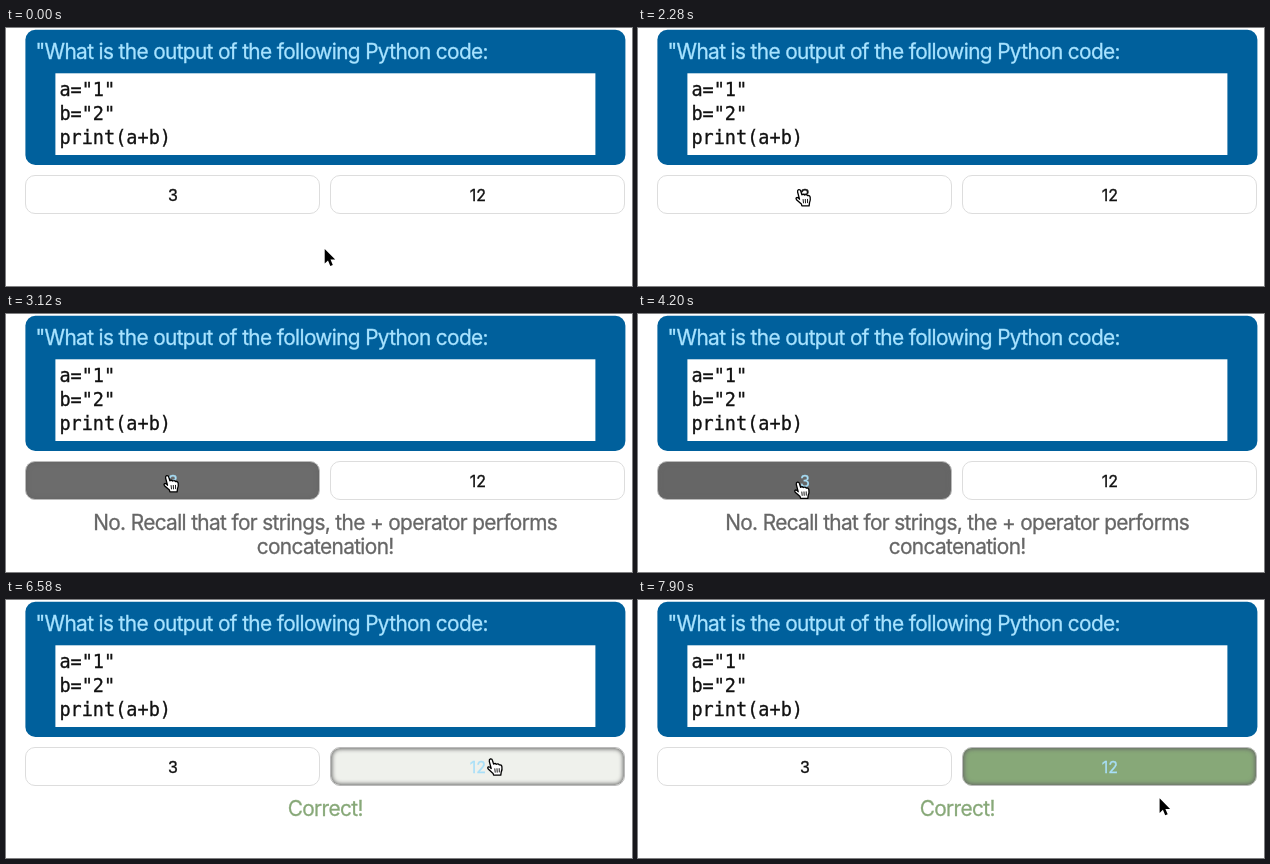
An HTML page that plays this animation: 626x258 px, repeating every 8 s.

```html
<!DOCTYPE html>
<html lang="en">
<head>
<meta charset="utf-8">
<title>Python quiz</title>
<style>
  html, body { margin: 0; width: 100%; height: 100%; overflow: hidden; background: #fff; }
  .answer { position: absolute; box-sizing: border-box; top: 147px; width: 295px; height: 39px;
            border: 1px solid #ddd; border-radius: 10px; }
  .answer.chosen { border-color: #bbb; box-shadow: inset 0 0 4px 1px #666; }
  svg { position: absolute; left: 0; top: 0; }
  text { font: 20.8px Inter, sans-serif; letter-spacing: -.03em; white-space: pre;
         fill: currentColor; stroke: currentColor; stroke-width: .3px; }
  .mono text { font: 18.55px "DejaVu Sans Mono", monospace; letter-spacing: 0; }
  .label { font-size: 16px; letter-spacing: 0; text-anchor: middle; }
  .feedback text { text-anchor: middle; }
</style>
</head>
<body>
<div class="answer" style="left:19px"></div>
<div class="answer" style="left:324px"></div>
<svg width="626" height="258" viewBox="0 0 626 258">
  <rect x="19.4" y="1.7" width="600" height="135.3" rx="10" fill="#00609c"/>
  <rect x="49.4" y="45.3" width="540" height="81.7" fill="#fff"/>
  <text x="29.5" y="31.4" color="#a8e3ff">"What is the output of the following Python code:</text>
  <g class="mono" color="#111">
    <text x="53.4" y="68">a="1"</text>
    <text x="53.4" y="92.2">b="2"</text>
    <text x="53.4" y="116.4">print(a+b)</text>
  </g>
  <text class="label" x="167" y="172.6">3</text>
  <text class="label" x="472" y="172.6">12</text>
  <g class="feedback" id="wrong" color="#666">
    <text x="319.2" y="216.4">No. Recall that for strings, the + operator performs</text>
    <text x="319.2" y="239.6">concatenation!</text>
  </g>
  <g class="feedback" id="right" color="#87a878">
    <text x="319.2" y="216.4">Correct!</text>
  </g>
  <g id="arrow">
    <path d="M0 0V14.6L3.3 11.5L5.6 17L8.1 16L5.8 10.6H10.5Z" stroke="#fff" stroke-width="1.4" paint-order="stroke"/>
  </g>
  <g id="hand" stroke="#000" stroke-linejoin="round" stroke-linecap="round">
    <path fill="#fff" stroke-width="1.3" d="M3.2 10.2L1.3 3Q1 1 2.4 .7Q4 .4 4.5 2.2L5.6 5.8Q7.2 4.6 8.4 6Q10.2 5 11.3 6.6Q13.5 6.1 13.9 8.4Q14.4 11.4 13.2 13.8L12.8 16.9H5.6L5.1 15.1L.2 10.7Q-.8 9.2 .4 8.6Q1.7 8.1 3.2 10.2Z"/>
    <path fill="none" stroke-width=".9" d="M6.8 10.5l.4 3.4M9 10.4l.2 3.5M11.2 10.3l.1 3.4"/>
  </g>
</svg>
<script>
const LOOP = 8000;

// [time, shape, x, y]
const cursorSteps = [
  [0, "arrow", 318.7, 221],
  [500, "arrow", 228, 190], [620, "hand", 166, 169], [740, "hand", 145, 162], [860, "hand", 136, 160],
  [1090, "hand", 153, 165], [1210, "hand", 169, 170.5],
  [2160, "hand", 163, 165], [2280, "hand", 158.3, 161],
  [4200, "hand", 157, 167.5], [4320, "hand", 155, 176], [4440, "arrow", 152, 194],
  [4560, "arrow", 149, 215], [4680, "arrow", 147.5, 233], [4790, "arrow", 148.7, 245],
  [5630, "arrow", 252.8, 190], [5750, "hand", 395, 167], [5870, "hand", 520, 163],
  [5990, "hand", 552, 164], [6110, "hand", 512, 160], [6220, "hand", 482, 158.3],
  [7420, "hand", 484, 160], [7540, "hand", 489, 164], [7660, "hand", 497, 171],
  [7780, "arrow", 513, 189], [7900, "arrow", 521.6, 198.3]
];

// [time, chosen answer, fill]
const answerSteps = [
  [0, -1, "#fff"],
  [2760, 0, "#f0f0f0"], [2880, 0, "#b0b0b0"], [3000, 0, "#858585"], [3120, 0, "#6c6c6c"], [3360, 0, "#666"],
  [6580, 1, "#eff1ec"], [6700, 1, "#bccdb3"], [6820, 1, "#99b58c"], [6940, 1, "#87a878"]
];

const byId = id => document.getElementById(id);
const cursors = { arrow: byId("arrow"), hand: byId("hand") };
const feedback = [byId("wrong"), byId("right")];
const buttons = document.querySelectorAll(".answer");
const labels = document.querySelectorAll(".label");

const stepAt = (steps, time) => steps.findLast(step => step[0] <= time);
const show = (node, on) => node.setAttribute("visibility", on ? "visible" : "hidden");

function draw(now) {
  const time = now % LOOP;
  const [, shape, x, y] = stepAt(cursorSteps, time);
  for (const name in cursors) show(cursors[name], name === shape);
  cursors[shape].setAttribute("transform", `translate(${x} ${y})`);

  const [, chosen, fill] = stepAt(answerSteps, time);
  buttons.forEach((button, i) => {
    const on = i === chosen;
    button.classList.toggle("chosen", on);
    button.style.background = on ? fill : "#fff";
    labels[i].setAttribute("color", on ? "#a8dff8" : "#111");
    show(feedback[i], on);
  });
}

const start = performance.now();
function tick() {
  draw(performance.now() - start);
  requestAnimationFrame(tick);
}
tick();
</script>
</body>
</html>
```
